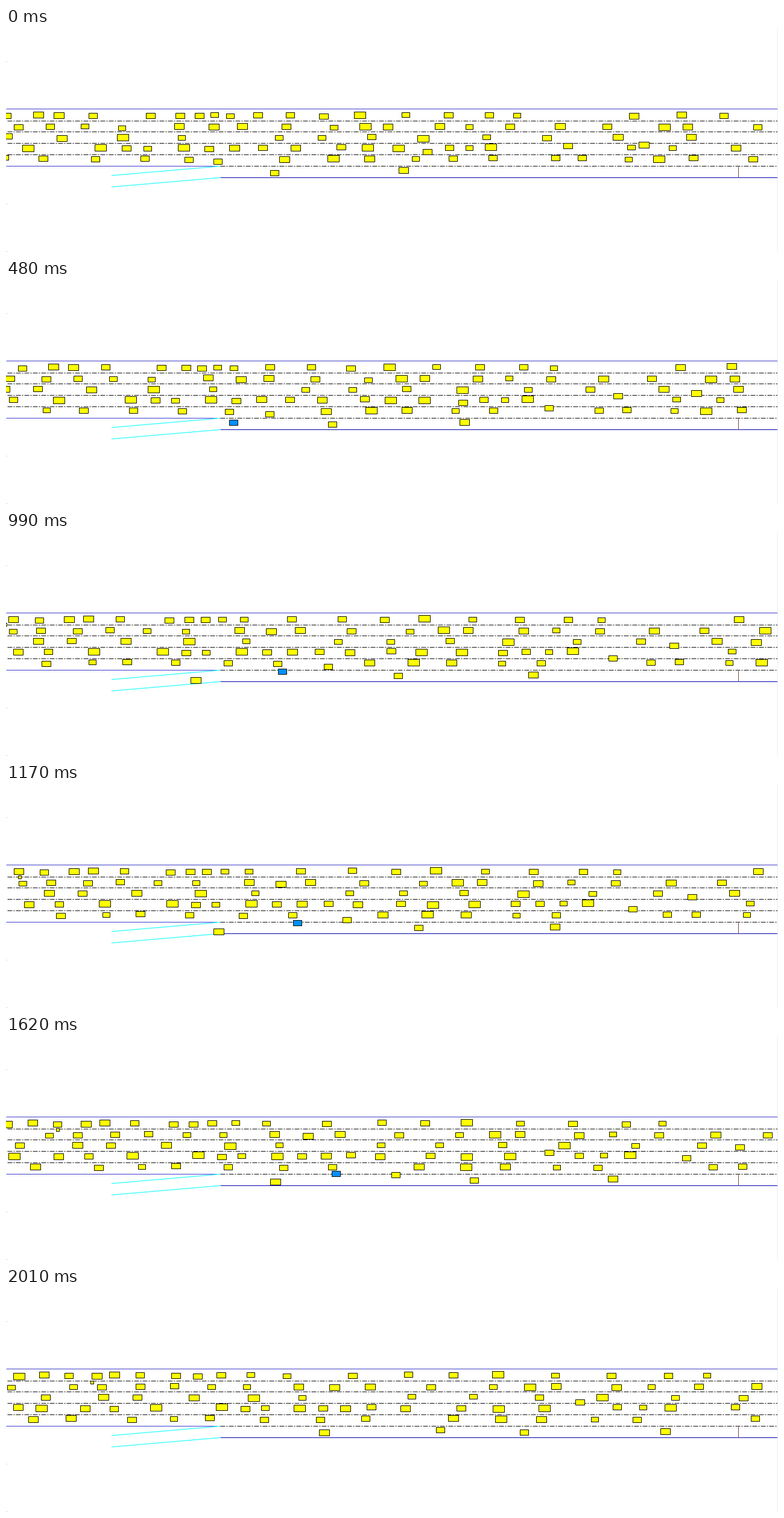
A matplotlib script for the animation above (2.04 s loop, 1280 by 372 pixels).

```python
import numpy as np
import matplotlib.pyplot as plt
from matplotlib.animation import FuncAnimation
from matplotlib.patches import Rectangle

W, H, DPI = 1280, 372, 100
FRAMES, STEP_MS, MID = 68, 30, 33
PX = 72 / DPI
EXIT_X = 1276
YELLOW, SKY = "#ffff00", "#0090ff"

TIME = np.arange(FRAMES)
# Simulation time lags a little behind the frame count in two stretches.
CLOCK = np.interp(TIME, (0, 10, 33, 46, 67), (0, 9, 32, 43.8, 64.8))
TICK = np.diff(CLOCK)

# Each lane has a speed profile along the road, given at these spots.
SPOTS = (0, 150, 230, 280, 340, 420, 500, 600, 720, 900, 1200)

rng = np.random.default_rng(7)

fig = plt.figure(figsize=(W / DPI, H / DPI), dpi=DPI, facecolor="white")
ax = fig.add_axes([0, 0, 1, 1])
ax.set_xlim(0, W)
ax.set_ylim(H, 0)
ax.axis("off")
cars = []


def line(x0, y0, x1, y1, color, width=1.0, **style):
    ax.plot([x0, x1], [y0, y1], color=color, lw=width * PX, zorder=1,
            solid_capstyle="butt", dash_capstyle="butt", **style)


def lane_mark(x, y):
    line(x, y, 1279, y, "#101010", linestyle=(0, (8, 2, 2, 2)))


def add_car(width, xs, ys, first=0, last=FRAMES, color=YELLOW):
    height = round(0.45 * width + 3)
    box = Rectangle((0, 0), width - 1, height - 1, facecolor=color,
                    edgecolor="#101000", lw=PX, joinstyle="miter", zorder=2)
    ax.add_patch(box)
    cars.append((box, width, height, xs, ys, first, last))


def drive(start, speeds, drift):
    """Follow the speed profile forwards and backwards from mid-loop."""
    x = np.zeros((FRAMES, len(start)))
    x[MID] = start

    def speed(n):
        return np.interp(x[n] + drift * (n - MID), SPOTS, speeds)

    for n in range(MID, FRAMES - 1):
        x[n + 1] = x[n] + speed(n) * TICK[n]
    for n in range(MID, 0, -1):
        x[n - 1] = x[n] - speed(n) * TICK[n - 1]
    return x


def add_lane(y, speeds, start, drift=0):
    """drift is how fast the slow patch travels back up the road."""
    for xs in drive(start, speeds, drift).T:
        width = rng.choice((13, 14, 15, 16, 16, 17, 18, 20))
        sway = 0.8 * np.sin(CLOCK / 20 + rng.uniform(0, 6))
        add_car(width, xs, y + rng.uniform(-1, 1) + sway)


def add_crossing(width, x, speed, *ys):
    """A car at steady speed that drifts sideways through the given heights."""
    add_car(width, x + speed * (CLOCK - CLOCK[MID]),
            np.interp(TIME, (0, MID, FRAMES - 1), ys))


def add_joining(width, keys, xs, ys, **look):
    """A car that comes up the ramp and settles on the road."""
    add_car(width, np.interp(TIME, keys, xs), np.interp(TIME, keys, ys),
            first=keys[0], **look)


# Road
line(0, 134, 1279, 134, "#4040c8")
for y in (154, 172, 191, 210):
    lane_mark(2, y)
line(0, 229, 355, 229, "#4040d0")
lane_mark(355, 229)
line(355, 248, 1279, 248, "#2020b8", 1.2)
line(175, 245, 355, 229.5, "#40ffff", 1.4)
line(175, 264, 355, 248.5, "#40ffff", 1.4)
line(1214, 230, 1214, 248, "#804838")
line(1279, 0, 1279, H, "#ececec")
for y in (55, 292, 371):
    line(0, y, 1, y, "#a0a0a0")

# Traffic, lane by lane: height, speeds at the spots, cars at mid-loop
add_lane(145.5, (1.7, 1.4, 1.2, 0.3, 0.35, 1.8, 2.9, 3.4, 3.4, 4.4, 5.9),
         (-32, 12, 55, 105, 137, 189, 271, 304, 331, 359, 395, 474, 557, 628,
          694, 774, 852, 932, 987, 1215, 1304, 1378), drift=1.4)
add_lane(164.5, (3.0, 3.1, 3.35, 3.3, 3.1, 2.9, 3.2, 4.0, 4.15, 4.65, 5.3),
         (-89, 12, 58, 119, 172, 234, 298, 387, 440, 488, 573, 670, 726, 766,
          858, 912, 985, 1075, 1158, 1259, 1299, 1416))
add_lane(182, (3.3, 3.3, 3.4, 3.5, 3.5, 2.75, 3.0, 3.7, 4.3, 4.75, 5.3),
         (-42, 54, 109, 199, 304, 398, 551, 638, 736, 833, 947, 1053, 1179,
          1305))
add_lane(199.5, (3.4, 3.4, 3.1, 2.95, 3.0, 3.0, 2.9, 2.4, 3.75, 4.4, 5.6),
         (-91, -53, 20, 70, 146, 260, 299, 332, 391, 433, 475, 520, 570, 639,
          689, 756, 862, 900, 940, 1204, 1279, 1390), drift=1.2)
add_lane(217.5, (4.7, 4.3, 4.0, 4.2, 4.5, 4.7, 4.7, 4.0, 4.4, 4.7, 5.4),
         (-108, -43, 67, 143, 201, 281, 368, 450, 603, 676, 739, 822, 887,
          1069, 1116, 1199, 1253, 1312, 1412))

# Lane changes and the extra lane on the right
add_crossing(6, -1, 4.4, 153, 154, 157)
add_crossing(18, 1244, 5.8, 194, 183, 183)
add_crossing(16, 1108, 5.5, 196, 189, 183)
add_crossing(15, 1006, 6.2, 216, 210, 198)
add_crossing(16, 824, 3.9, 206, 201, 190)
add_crossing(15, 534, 5.7, 222, 224, 236)
add_crossing(15, 650, 6.4, 241, 239, 240)
add_crossing(17, 874, 6.7, 236, 237, 238)
add_joining(18, (23, 33, 67), (180, 315, 528), (259, 246.5, 240))
add_joining(15, (1, 10, 33, 60), (186, 349, 458, 573), (255, 239, 232, 228),
            last=60, color=SKY)


def draw(n):
    for box, w, h, xs, ys, first, last in cars:
        x, y = xs[n], ys[n]
        box.set_xy((x - w / 2, y - h / 2))
        box.set_visible(first <= n < last and -w / 2 < x < EXIT_X - w / 2)
    return [car[0] for car in cars]


anim = FuncAnimation(fig, draw, frames=FRAMES, interval=STEP_MS, repeat=True,
                     cache_frame_data=False)
plt.show()
```
